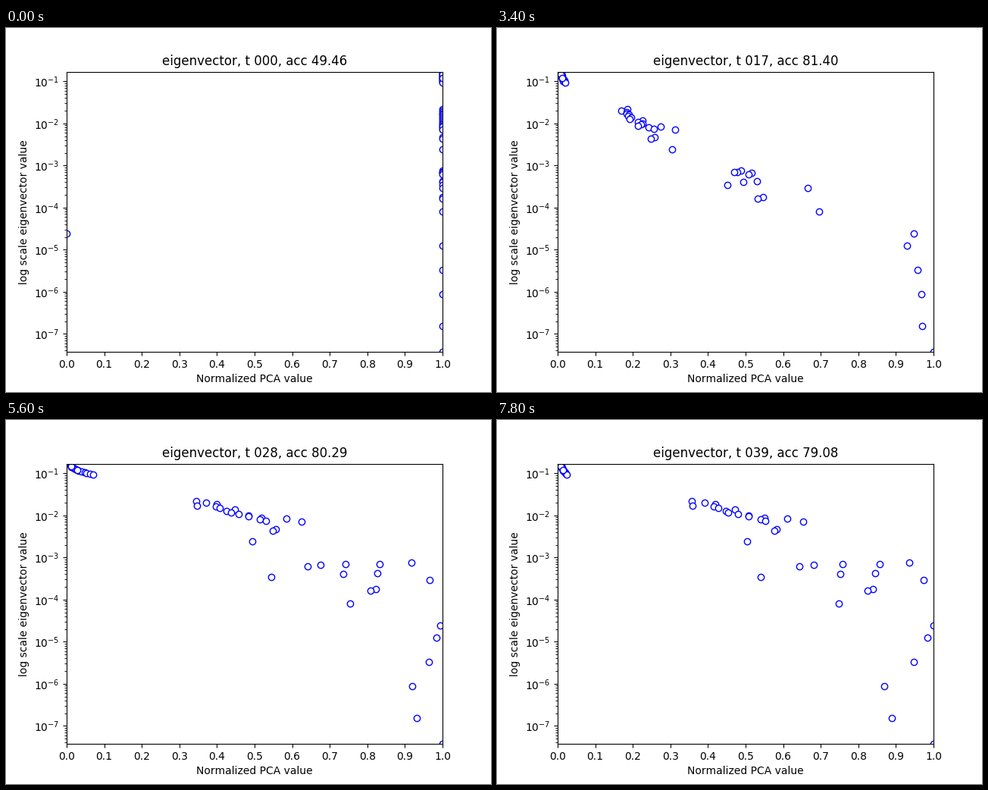
These frames come from a looping animation (640 px wide and 480 px high, 8 s). A matplotlib script:

```python
import numpy as np
import matplotlib.pyplot as plt
from matplotlib.animation import FuncAnimation

STEPS, DELAY = 40, 200
LEFT, WIDTH = 80, 496            # axes box in pixels
TOP, BOTTOM = 57.6, 427.2
DECADE, TOP_TICK = 55.5, 70.3    # pixels per decade, height of 10^-1
KNOTS = (10, 17, 21, 28, 32, 39)
ACC = (49.46, 67.65, 81.40, 90.82, 80.29, 80.15, 79.08)
BEST_STEP = 21

# Loose dots: height in pixels, value at the best step, drift after it.
LOOSE = (
    (130, 0.466, 0.95), (134, 0.510, 0.95), (144, 0.442, 0.92),
    (146, 0.431, 0.95), (160, 0.450, 0.35), (188, 0.778, 2.30),
    (190, 0.663, 0.75), (190, 0.708, 1.45), (191, 0.653, 0.20),
    (193, 0.635, 0.05), (202, 0.732, 1.10), (203, 0.669, 0.65),
    (207, 0.563, -0.15), (211, 0.887, 2.50), (223, 0.738, 1.00),
    (225, 0.724, 0.95), (242, 0.776, -0.25),
)
# Dots near one: height, gap that closes, rate of falling back.
TAIL = (
    (271, 0.21, 0), (287, 0.27, 0.0005), (319, 0.12, 0.0018),
    (351, 0, 0.0045), (393, 0.018, 0.0038),
)

rng = np.random.default_rng(4)
loose_y, home, drift = np.array(LOOSE).T
tail_y, gap, fall = np.array(TAIL).T

# A band of dots that lie along a line in logit space.
band_y = np.linspace(107, 133, 15)
band_logit = -0.9 + 0.021 * (band_y - 107) + rng.uniform(-0.07, 0.07, 15)
band_drift = 0.45 + 0.018 * (band_y - 107) + rng.uniform(-0.2, 0.2, 15)

logit = np.concatenate((band_logit, np.log(home / (1 - home))))
drift = np.concatenate((band_drift, drift))

# The crowd in the top left corner, last two dots in front.
depth = np.append(np.linspace(0, 1, 15), (0.23, 0.58))
wobble = np.append(rng.uniform(-1.5, 1.5, 15), (0, 0))
crowd_y = TOP + 14.6 * depth


def to_value(y):
    return 10 ** (-1 - (y - TOP_TICK) / DECADE)


values = to_value(np.concatenate((crowd_y, band_y, loose_y, tail_y, [BOTTOM])))
outlier = len(values) - len(TAIL) - 1


def bump(t, center, width):
    return np.exp(-((t - center) / width) ** 2)


def crowd(t):
    spread = 6 + 36 * bump(t, 31, 5)
    return np.maximum(4 + spread * depth ** 2 + wobble, 0) / WIDTH


def body(t):
    shift = np.interp(t, (1, 10, 17, 21), (-1.8, -1.4, -0.5, 0))
    pull = np.interp(t, KNOTS, (-0.25, -0.35, 0, 0.5, 1, 0.62))
    return 1 / (1 + np.exp(-(logit + shift + drift * pull)))


def tail(t):
    return 1 - gap * np.exp(-0.2 * (max(t, 6) - 10)) - fall * (t - 10)


def positions(t):
    if t == 0:
        x = np.ones(len(values))
        x[outlier] = 0
        return x
    floor = 1 - 0.01 * bump(t, 10, 1.5) - 0.026 * bump(t, 32, 2)
    return np.minimum(np.concatenate((crowd(t), body(t), tail(t), [floor])), 1)


plt.rcParams["text.kerning_factor"] = 6
fig, ax = plt.subplots(figsize=(6.4, 4.8), dpi=100)
ax.set_yscale("log")
ax.set_xlim(0, 1)
ax.set_ylim(to_value(BOTTOM), to_value(TOP))
ax.set_xticks(np.arange(11) / 10)
ax.set_xlabel("Normalized PCA value")
ax.set_ylabel("log scale eigenvector value")
title = ax.set_title("")
dots, = ax.plot([], [], "o", mfc="white", mec="blue", ms=6, mew=1)


def draw(t):
    dots.set_data(positions(t), values)
    star = "*" if t == BEST_STEP else ""
    acc = np.interp(t, (0,) + KNOTS, ACC)
    title.set_text(f"eigenvector, t {t:03d}, acc {acc:.2f}{star}")
    return dots, title


anim = FuncAnimation(fig, draw, frames=STEPS, init_func=lambda: draw(0),
                     interval=DELAY, repeat=True, repeat_delay=0)
plt.show()
```
